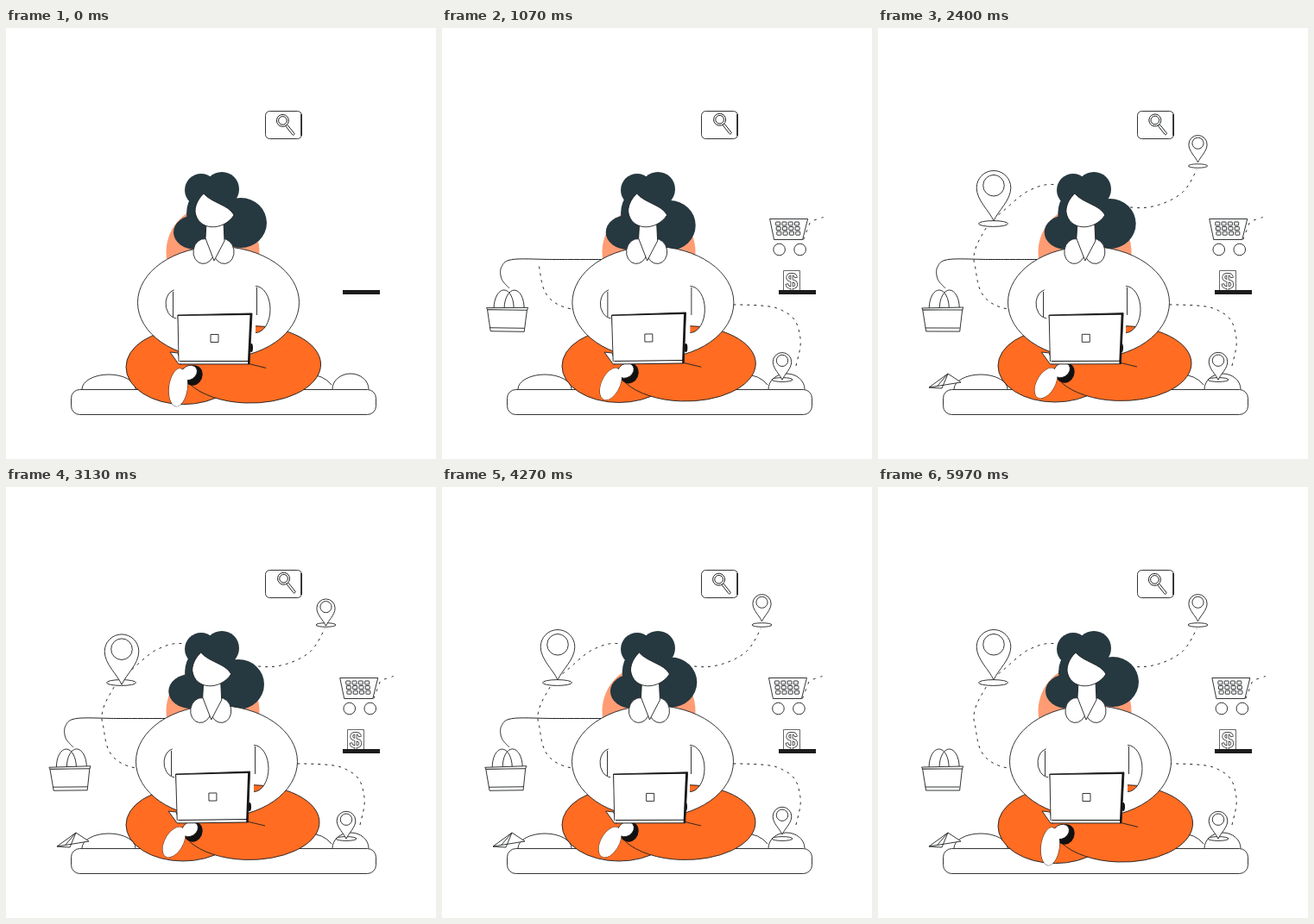
An HTML page with a canvas that plays this animation: 498 by 500 pixels, repeating every 6.01 s.

```html
<!DOCTYPE html>
<html lang="en">
<head>
<meta charset="utf-8">
<title>Online shopping</title>
<style>
  html, body { margin: 0; width: 100%; height: 100%; overflow: hidden; background: #fff; }
  canvas { display: block; width: 498px; height: 500px; }
</style>
</head>
<body>
<canvas id="stage"></canvas>
<script>
const W = 498, H = 500, LOOP = 6010, TURN = Math.PI * 2, HALF = Math.PI;
const INK = '#1c1f21', ORANGE = '#ff6c22', PEACH = '#ff9c74', HAIR = '#263840';
const canvas = document.getElementById('stage');
const ctx = canvas.getContext('2d');
const ratio = window.devicePixelRatio || 1;
canvas.width = W * ratio;
canvas.height = H * ratio;

const clamp = v => Math.max(0, Math.min(1, v));
const mix = (a, b, k) => a + (b - a) * k;
const easeOut = u => 1 - (1 - clamp(u)) ** 2;
const wave = (t, cycles) => Math.cos(TURN * cycles * t / LOOP);

function poly(...p) {
  const path = new Path2D();
  for (let i = 0; i < p.length; i += 2) path.lineTo(p[i], p[i + 1]);
  return path;
}

function shape(...p) {
  const path = poly(...p);
  path.closePath();
  return path;
}

function oval(x, y, rx, ry = rx, tilt = 0, from = 0, to = TURN) {
  const path = new Path2D();
  path.ellipse(x, y, rx, ry, tilt, from, to);
  return path;
}

function box(x, y, w, h, r) {
  const path = new Path2D();
  path.roundRect(x, y, w, h, r);
  return path;
}

function paint(path, fill, stroke = INK, width = 0.9) {
  if (fill) { ctx.fillStyle = fill; ctx.fill(path); }
  if (stroke) { ctx.strokeStyle = stroke; ctx.lineWidth = width; ctx.stroke(path); }
}

const outline = path => paint(path, null);

function layer(x, y, draw, scale = 1, angle = 0) {
  if (scale <= 0) return;
  ctx.save();
  ctx.translate(x, y);
  ctx.rotate(angle);
  ctx.scale(scale, scale);
  draw();
  ctx.restore();
}

// Samples a Catmull-Rom curve, so that it can be drawn up to a given length
function sample(...p) {
  const n = p.length / 2, out = [];
  const get = (i, o) => p[Math.max(0, Math.min(n - 1, i)) * 2 + o];
  for (let i = 0; i < n - 1; i++) {
    for (let u = 0; u < 1; u += 0.05) {
      out.push([0, 1].map(o => {
        const [a, b, c, d] = [-1, 0, 1, 2].map(k => get(i + k, o));
        return b + u * (c - a + u * (2 * a - 5 * b + 4 * c - d + u * (3 * b - 3 * c + d - a))) / 2;
      }));
    }
  }
  return out;
}

function trace(points, length, dash = []) {
  if (length <= 0) return;
  const path = new Path2D();
  path.moveTo(...points[0]);
  for (let i = 1; i < points.length && length > 0; i++) {
    const [ax, ay] = points[i - 1], [bx, by] = points[i];
    const d = Math.hypot(bx - ax, by - ay), u = Math.min(1, length / d);
    path.lineTo(mix(ax, bx, u), mix(ay, by, u));
    length -= d;
  }
  ctx.setLineDash(dash);
  paint(path, null, INK, 1);
  ctx.setLineDash([]);
}

const route = sample(410, 392, 415, 360, 400, 331, 345, 321, 150, 326, 112, 275,
  124, 234, 150, 208, 176, 188, 207, 182, 255, 200, 308, 208.5, 350, 193, 370, 163);
const string = sample(78, 302, 69, 291, 69, 277, 82, 268.5, 130, 268.5, 190, 268.5);

function cushion() {
  paint(oval(119, 419, 31, 17, 0, HALF, TURN), '#fff');
  outline(oval(350, 430, 33, 28, 0, -HALF / 2, -0.6));
  paint(oval(399, 419, 21, 18, 0, HALF, TURN), '#fff');
  paint(box(75.5, 419.5, 353, 29, 10), '#fff');
}

function searchCard(sway) {
  paint(box(300.5, 96.5, 42, 32, 5), '#fff');
  paint(poly(342, 100, 342, 125), null, INK, 1.6);
  layer(321 - 0.6 * sway, 106.8 + 0.6 * sway, () => {
    paint(box(7, -1.3, 14, 2.6, 1), '#fff');
    paint(oval(0, 0, 7), '#fff');
    outline(oval(0, 0, 4.8));
  }, 1, 0.9);
}

function pin(x, top, r, scale) {
  layer(x, top + 2.95 * r, () => {
    const c = -1.95 * r;
    const path = new Path2D();
    path.moveTo(0, 0);
    path.bezierCurveTo(-0.25 * r, -0.6 * r, -r, -1.2 * r, -r, c);
    path.arc(0, c, r, HALF, 0);
    path.bezierCurveTo(r, -1.2 * r, 0.25 * r, -0.6 * r, 0, 0);
    paint(path, '#fff');
    outline(oval(0, c - 0.13 * r, 0.62 * r));
  }, scale);
}

function pinBase(x, y, rx, scale) {
  layer(x, y, () => paint(oval(0, 0, rx, rx / 5), '#fff'), scale);
}

function cart(x, scale) {
  layer(x + 22, 240.5, () => {
    paint(shape(-22, -19, 22, -19, 16, 5, -17, 5), '#fff');
    for (let row = 0; row < 3; row++) {
      for (let col = 0; col < 4; col++) {
        outline(box(-15 + col * 7.3 + row * 0.6, -15.5 + row * 5.6, 5, 4, 0.5));
      }
    }
    ctx.setLineDash([3, 6]);
    outline(poly(17, 5, 25, -16, 40, -21));
    ctx.setLineDash([]);
    for (const wx of [-11, 13]) paint(oval(wx, 16.5, 6.8), '#fff');
  }, scale);
}

function basket(swing, scale) {
  layer(74.6 + swing, 326, () => {
    for (const hx of [-4, 8]) outline(oval(hx, -1, 11.5, 21, 0, HALF, TURN));
    paint(shape(-23, 1, 23, 0, 20, 26, -19, 26), '#fff');
    outline(poly(-20, 22, 20, 22));
    paint(shape(-24, -1, 24, -2, 23, 1, -23, 1), '#fff');
  }, scale, swing * 0.015);
}

function money(rise) {
  ctx.save();
  ctx.clip(box(385, 270, 50, 35, 0));
  ctx.translate(0, 26 * (1 - rise));
  paint(box(395.5, 281.5, 19, 25, 0), '#fff', '#555');
  ctx.font = '24px "Liberation Sans", Arial, sans-serif';
  ctx.textAlign = 'center';
  ctx.lineWidth = 1.8;
  ctx.strokeStyle = '#444';
  ctx.strokeText('$', 405, 301.5);
  ctx.fillStyle = '#fff';
  ctx.fillText('$', 405, 301.5);
  ctx.restore();
  paint(box(390, 304, 43, 5, 0), '#1c1c1c', null);
}

function plane(back) {
  layer(59 + 90 * back, 417 - 41 * back, () => {
    paint(shape(0, 0, 22, -16, 37, -6), '#fff');
    outline(poly(0, 0, 15, 1, 22, -16, 10, -2));
  });
}

function hair(sway, flow) {
  const left = 3 * sway - flow - 2;
  const right = 1.5 * sway + 3.3 * flow - 4.8;
  const lobes = [
    oval(226, 188, 19),
    oval(250, 187, 20),
    oval(239 + sway, 215, 31, 33),
    oval(220 + left, 237, 26, 20),
    oval(272 + right, 227.5 - 1.5 * sway, 30, 29),
  ];
  for (const lobe of lobes) paint(lobe, HAIR, null);
}

function head() {
  for (const side of [-1, 1]) paint(oval(240.5 + 11.5 * side, 259, 12, 14.5, -0.15 * side), '#fff');
  paint(poly(232, 226, 231, 244, 241, 270, 253, 247, 252, 226), '#fff');
  const face = new Path2D();
  face.moveTo(229, 192);
  face.bezierCurveTo(238, 203, 258, 205, 264, 217);
  face.bezierCurveTo(252, 236, 222, 236, 219, 213);
  face.bezierCurveTo(219, 203, 225, 196, 229, 192);
  paint(face, '#fff');
}

const frontLeg = oval(282, 389, 81, 43.5);

function legs(k) {
  ctx.save();
  ctx.translate(139, 346);
  ctx.scale(1 + 0.007 * k, 1 + 0.03 * k);
  ctx.translate(-139, -346);
  paint(oval(205, 392, 66, 42), ORANGE);
  paint(frontLeg, ORANGE, null);
  outline(oval(282, 389, 81, 43.5, 0, -1.5, 2.6));
  outline(poly(255, 385, 275, 387, 300, 393));
  ctx.restore();
}

function foot(k) {
  const sole = oval(mix(194.5, 199.5, k), mix(412, 417, k), 10.5, mix(19, 22, k), mix(0.5, 0.12, k));
  const ankle = oval(mix(213, 212, k), mix(397, 400, k), 10, 8, -0.6);
  paint(oval(217, mix(400, 403, k), 10.5, 12, 0.4), '#111', null);
  outline(sole);
  paint(ankle, '#fff');
  paint(sole, '#fff', null);
}

function body(k) {
  layer(2 * k, 0, () => {
    paint(oval(244, 318.5, 93.5, 65), '#fff');
    outline(oval(197, 320, 14, 17, 0, 1.7, 4.4));
    outline(poly(191.5, 306, 191.5, 335));
    const gap = oval(287, 326.5, 17, 27, 0, -HALF / 2, HALF / 2);
    ctx.save();
    ctx.clip(gap);
    paint(frontLeg, ORANGE);
    ctx.restore();
    outline(gap);
    outline(poly(288.5, 301, 288.5, 333));
    paint(oval(282, 371, 2, 5), '#111', null);
  });
}

function laptop(sway) {
  layer(199 + 0.9 * (sway - 1), 390, () => {
    paint(shape(-9, -14, 0, -13, 4, 0, 1, 0), '#fff');
    paint(shape(0, -57, 86, -59, 83, 0, 3, 0), '#151515');
    paint(shape(0, -56, 83.5, -57, 81, -4, 1, -4), '#fff', null);
    paint(shape(1, -3, 81, -3, 81, -0.5, 3, -0.5), '#fff', null);
    outline(poly(0, -57, 1, -3));
    outline(box(38, -34.5, 9, 9, 0));
  }, 1, 0.006 * (sway - 1));
}

function render(t) {
  const sway = wave(t, 3), flow = wave(t, 2);
  const k = ((1 + wave(t, 1)) / 2) ** 5;
  const bob = 3 * Math.cos(TURN * (t - LOOP) / 1800);
  const hop = 5 * Math.exp(-(((t - 4270) / 350) ** 2));
  const pop = (start, span = 300) => easeOut((t - start) / span);

  ctx.setTransform(ratio, 0, 0, ratio, 0, 0);
  ctx.fillStyle = '#fff';
  ctx.fillRect(0, 0, W, H);
  ctx.lineJoin = 'round';

  paint(oval(239.5, 260, 54), PEACH, null);
  trace(route, (t - 215) * 0.456, [3, 5]);
  trace(string, Math.min((t - 300) * 0.3, 152 - Math.max(0, t - 4730) * 0.17));
  cushion();
  if (t >= 1300) plane(1 - easeOut((t - 1300) / 850));

  searchCard(sway);
  basket(Math.sin(TURN * Math.min(t, 5070) / 5070), pop(150));
  cart(382.4 + 4.5 * flow, pop(100));
  money(pop(200, 600));

  pinBase(394, 408, 12, pop(250));
  pinBase(133.5, 227, 17, pop(1850));
  pinBase(370.5, 160, 11.5, pop(2150));
  pin(394, 376.3 - hop, 10.8, pop(250, 900));
  pin(134, 168.5 - bob, 19.8, pop(1230, 400));
  pin(370.5, 127.5 - bob, 10.6, pop(1800, 400));

  hair(sway, flow);
  legs(k);
  foot(k);
  body(k);
  layer(1.7 * (sway - 1), 0, head);
  laptop(sway);
}

let start;
function tick(now) {
  start ??= now;
  render((now - start) % LOOP);
  requestAnimationFrame(tick);
}
render(0);
requestAnimationFrame(tick);
</script>
</body>
</html>
```
